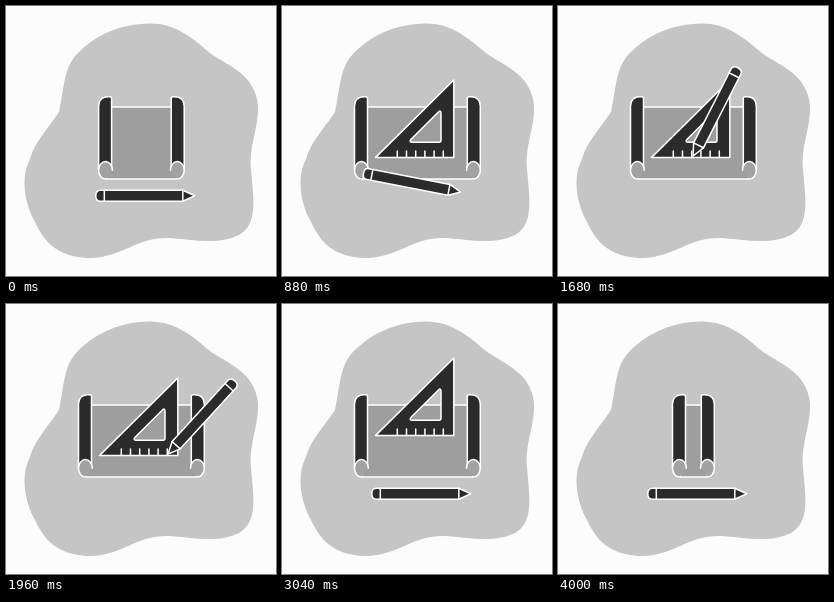
These frames come from a looping animation (270 px wide and 270 px high, 4.8 s). An HTML page:

```html
<!DOCTYPE html>
<html lang="en">
<head>
<meta charset="utf-8">
<title>Drafting tools</title>
<style>
  html, body { margin: 0; width: 100%; height: 100%; overflow: hidden; background: #fcfcfc; }
  svg { display: block; width: 100%; height: 100%; }
  .ink { fill: #2b2b2b; }
  .paper { fill: #9e9e9e; }
  .curl { fill: #a2a2a2; }
  .line { fill: none; }
  .edge { stroke: #fff; stroke-width: 1.5; stroke-linejoin: round; stroke-linecap: round; }
</style>
</head>
<body>
<svg viewBox="0 0 270 270">
  <defs>
    <g id="roll" class="edge">
      <path class="ink" d="M13.6 161V92.500Q13.600 90.700 11.800 90.700H10C4 90.700 .6 94.500 .6 100V164Z"/>
      <path class="curl" d="M7.500 173A6.900 8.700 0 1 1 14.400 164.300"/>
    </g>
  </defs>

  <path fill="#c5c5c5" d="M143 17.500C168 17 184 30 204 47C222 60 249 68 252 99C253 122 243 138 245 163C247 190 253 218 233 229C210 240 185 233 163 232C130 231 118 251 84 252C50 251 38 235 29 216C19 198 14 172 24 153C28 137 43 121 53 106C58 85 57 60 73 46C91 28 115 18 143 17.500Z"/>

  <path id="sheet" class="paper edge"/>
  <use id="left" href="#roll"/>
  <use id="right" href="#roll"/>

  <g id="square" class="edge">
    <path class="ink" fill-rule="evenodd" d="M171.800 74V151.600H93.400ZM159 107.500Q159 103.500 156.200 106.200L129.300 133Q126.500 136.200 130 136.200H157Q159 136.200 159 134.200Z"/>
    <path id="ticks" class="line"/>
  </g>

  <g id="pencil" class="edge">
    <path class="ink" d="M-45-5.500H37.500L49.500 0L37.500 5.500H-45Q-49.500 5.500-49.500 0T-45-5.500Z"/>
    <path class="line" d="M-41-5.500V5.500M37.500-5.500V5.500"/>
  </g>
</svg>
<script>
const LOOP = 4800, STEP = 40, MID = 135.4;
const REST = { x: 139.3, y: 189.7, a: 0 };
const el = id => document.getElementById(id);
const sheet = el('sheet'), left = el('left'), right = el('right');
const square = el('square'), pencil = el('pencil');

const span = (t, from, to) => Math.min(1, Math.max(0, (t - from) / (to - from)));
const mix = (a, b, u) => a + (b - a) * u;
const smooth = u => u * u * (3 - 2 * u);
const easeOut = (u, power) => 1 - (1 - u) ** power;
const backOut = (u, c = 2) => 1 + (c + 1) * (u - 1) ** 3 + c * (u - 1) ** 2;

el('ticks').setAttribute('d',
  Array.from({ length: 6 }, (_, i) => `M${115.3 + i * 9.2} 145v6.5`).join(''));

function drawScroll(t) {
  const open = t < 3640 ? backOut(span(t, -40, 280)) : 1 - smooth(span(t, 3640, 4000));
  const half = mix(21.5, 63.5, open);
  const x1 = MID - half, x2 = MID + half;
  sheet.setAttribute('d', `M${x1 + 8} 101H${x2 - 8}V173H${x1 + 8}Z`);
  left.setAttribute('transform', `translate(${x1})`);
  right.setAttribute('transform', `translate(${x2}) scale(-1 1)`);
}

function drawSquare(t) {
  const away = Math.max(0, t < 1800 ? 720 - t : t - 2840);
  square.setAttribute('transform', `translate(0 ${-20 * (away / 200) ** 2.1})`);
  square.setAttribute('opacity', away > 320 ? 0 : 1 - 0.7 * span(away, 200, 320));
}

// The tip follows the ruler's base, then its upright side
function drawingPose(t) {
  const u = span(t, 1240, 2060);
  const a = mix(92.5, 138, u), r = a * Math.PI / 180;
  const tipX = mix(92.7, 171.7, u), tipY = 150 - 17 * span(t, 2060, 2140);
  return { x: tipX - 49.5 * Math.cos(r), y: tipY - 49.5 * Math.sin(r), a };
}

function pencilPose(t) {
  const p = drawingPose(t);
  if (t < 1240) {
    const u = span(t, 840, 1240);
    return {
      x: mix(REST.x, p.x, easeOut(u, 2.2)),
      y: mix(REST.y, p.y, easeOut(u, 1.5)),
      a: mix(REST.a, p.a, easeOut(u, 1.2))
    };
  }
  const u = span(t, 2140, 2640);
  return {
    x: mix(p.x, REST.x, easeOut(u, 1.8)),
    y: mix(p.y, REST.y, smooth(u ** 1.5)),
    a: mix(p.a, REST.a, smooth(u ** 0.9))
  };
}

function drawPencil(t) {
  const { x, y, a } = pencilPose(t);
  pencil.setAttribute('transform', `translate(${x} ${y}) rotate(${a})`);
}

function draw() {
  const t = Math.floor(performance.now() % LOOP / STEP) * STEP;
  drawScroll(t);
  drawSquare(t);
  drawPencil(t);
  requestAnimationFrame(draw);
}
draw();
</script>
</body>
</html>
```
